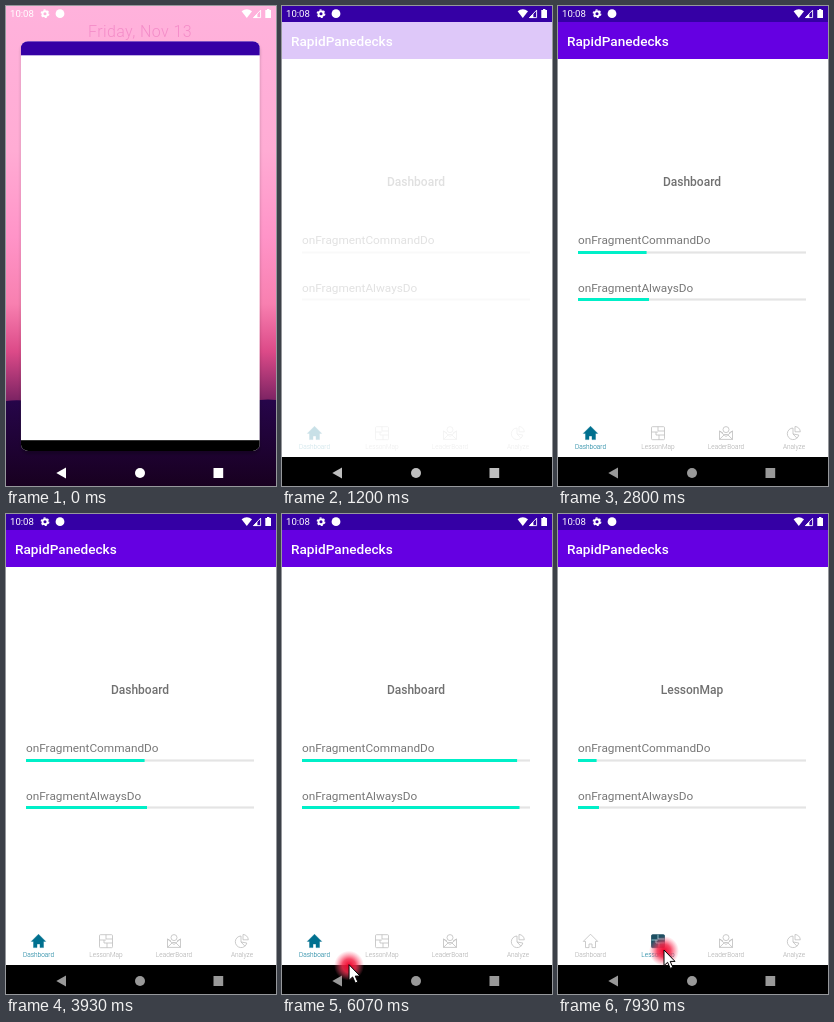
These frames come from a looping animation (270x480 px, 8 s). An HTML page:

```html
<!DOCTYPE html>
<html lang="en">
<head>
<meta charset="utf-8">
<title>Tab pager demo</title>
<style>
  html, body { margin: 0; width: 100%; height: 100%; overflow: hidden; background: #000; }
  svg { display: block; width: 100%; height: 100%; }
  text { font-family: Roboto, sans-serif; }
  .label { font-size: 11.8px; fill: #787878; }
  .tab { fill: none; stroke: #bebebe; stroke-width: .8; stroke-linejoin: round; }
  .tab text { font-size: 6.5px; font-weight: 300; text-anchor: middle; fill: #a8a8a8; stroke: none; }
  .tab.on .body { fill: #00708f; stroke: #00708f; stroke-width: .4; }
  .tab.on .map { fill: #1d4f62; stroke: #1d4f62; }
  .tab.on .inner { stroke: #a9dbe2; }
  .tab.on text { fill: #007796; }
  .track { fill: #e4e4e4; }
  .fill { fill: #00efc8; }
</style>
</head>
<body>
<svg viewBox="0 0 270 480" preserveAspectRatio="none">
  <defs>
    <linearGradient id="sky" x2="0" y2="1">
      <stop offset="0" stop-color="#ffb2dc"/>
      <stop offset=".3" stop-color="#ffacd4"/>
      <stop offset=".48" stop-color="#ff94c8"/>
      <stop offset=".62" stop-color="#f880b0"/>
      <stop offset=".72" stop-color="#dc4a88"/>
      <stop offset=".82" stop-color="#7e2464"/>
    </linearGradient>
    <linearGradient id="hill" x2="0" y2="1">
      <stop offset="0" stop-color="#26054a"/>
      <stop offset="1" stop-color="#180020"/>
    </linearGradient>
    <radialGradient id="glow">
      <stop offset="0" stop-color="#f00028"/>
      <stop offset=".45" stop-color="#f52a4c" stop-opacity=".85"/>
      <stop offset="1" stop-color="#ff6080" stop-opacity="0"/>
    </radialGradient>
    <filter id="shadow"><feDropShadow dx="0" dy="3" stdDeviation="1.5" flood-opacity=".25"/></filter>
    <clipPath id="frame"><rect id="frameRect" width="270"/></clipPath>
  </defs>

  <g id="wallpaper">
    <rect width="270" height="480" fill="url(#sky)"/>
    <path d="M0 395Q20 392 40 400H230Q250 392 270 394V480H0Z" fill="url(#hill)"/>
    <text x="134" y="31" font-size="16" font-weight="300" letter-spacing=".4" text-anchor="middle" fill="#f48cc8">Friday, Nov 13</text>
  </g>

  <g id="shade">
    <g id="window">
      <g clip-path="url(#frame)">
        <rect width="270" height="480" fill="#fff"/>
        <rect width="270" height="16" fill="#3500a5"/>
        <rect y="451" width="270" height="29"/>
      </g>
    </g>
  </g>

  <g id="app">
    <rect y="16" width="270" height="37" fill="#6500e2"/>
    <text x="9" y="39.5" font-size="13.6" font-weight="500" fill="#fff">RapidPanedecks</text>
    <text id="heading" x="134" y="179.6" font-size="12" font-weight="500" text-anchor="middle" fill="#707070"></text>
    <text class="label" x="20" y="238">onFragmentCommandDo</text>
    <text class="label" x="20" y="285.6">onFragmentAlwaysDo</text>
    <g id="bars">
      <rect class="track" x="20" y="245.4" width="228" height="2.2"/>
      <rect class="track" x="20" y="292.4" width="228" height="2.2"/>
      <rect class="fill" x="20" y="245" height="3"/>
      <rect class="fill" x="20" y="292" height="3"/>
    </g>
    <g class="tab" transform="translate(32.5 427)">
      <path class="body" d="M0-6.8L7.2 .4H5V6.6H1.5V3H-1.5V6.6H-5V.4H-7.2Z"/>
      <text y="16">Dashboard</text>
    </g>
    <g class="tab" transform="translate(100 427)">
      <rect class="map" x="-6.5" y="-6.3" width="13" height="13" rx="1"/>
      <path class="inner" d="M-6.5-1H-2V2H1V6.7M0-6.3V-2H6.5M1 2H6.5M-2-1H0"/>
      <text y="16">LessonMap</text>
    </g>
    <g class="tab" transform="translate(168 427)">
      <circle cy="-3.4" r="3"/>
      <path d="M-3 0L-6.5-2V6.4H6.5V-2L3 0M-6.5 6.4L-1.5 1.5H1.5L6.5 6.4M-6.5-2L0 3.5L6.5-2"/>
      <text y="16">LeaderBoard</text>
    </g>
    <g class="tab" transform="translate(236 427)">
      <path d="M-1-5A5.8 5.8 0 1 0 4.8 2L-1 1ZM1-6.5V-1.2H6.3A5.4 5.4 0 0 0 1-6.5ZM-1 1L3 5.2"/>
      <text y="16">Analyze</text>
    </g>
  </g>

  <g fill="#fff">
    <text x="4" y="11.4" font-size="9.6">10:08</text>
    <circle cx="39" cy="7.7" r="2.5" fill="none" stroke="#fff" stroke-width="1.9"/>
    <circle cx="39" cy="7.7" r="3.8" fill="none" stroke="#fff" stroke-width="1.2" stroke-dasharray="2 1.98"/>
    <circle cx="54" cy="7.7" r="4.4"/>
    <path d="M235.6 5.3Q240.8 1.2 246 5.3L240.8 12Z"/>
    <path d="M247.5 11.6L254.6 4.2V11.6Z" fill="none" stroke="#fff" stroke-width=".9"/>
    <path d="M247 12L251.4 7.5V12Z"/>
    <path d="M259.3 4H261V3H263.4V4H265V12H259.3Z"/>
  </g>
  <g id="nav">
    <path d="M50.3 467L60 461.5V472.5Z"/>
    <circle cx="134" cy="467" r="5"/>
    <rect x="207.5" y="462" width="9.7" height="10"/>
  </g>
  <g id="pointer">
    <circle r="15" fill="url(#glow)"/>
    <path d="M0-1V14.6L3.6 11.3L6.3 17.4L8.8 16.3L6.2 10.4H11Z" fill="#fff" stroke="#000" stroke-width="1"/>
  </g>
</svg>
<script>
const LOOP = 8000, SWITCH = 7400;
const el = id => document.getElementById(id);
const tabs = document.querySelectorAll('.tab');
const fills = document.querySelectorAll('.fill');
const pages = ['Dashboard', 'LessonMap'];

// Rows of [time, value, ...], joined by straight lines and held at both ends.
function track(rows, t) {
  if (t <= rows[0][0]) return rows[0].slice(1);
  const i = rows.findIndex(row => row[0] > t);
  if (i < 0) return rows[rows.length - 1].slice(1);
  const a = rows[i - 1], b = rows[i], k = (t - a[0]) / (b[0] - a[0]);
  return a.slice(1).map((v, j) => v + (b[j + 1] - v) * k);
}

// Each row: time, scale, left, top, corner radius, visible height.
const opening = [
  [0, .884, 15, 35.4, 8, 463],
  [70, .94, 7.8, 18.3, 4, 471],
  [130, .972, 3.6, 8.5, 2, 476],
  [200, .992, 1, 2.4, .5, 479],
  [270, 1, 0, 0, 0, 480]
];
const fade = [[1070, 0], [1670, 1]];
const navGrey = [[870, 255], [1400, 153]];
const barEdge = [
  [[1300, 20], [1670, 38], [2530, 79], [2730, 91], [3130, 107], [3330, 113],
   [3530, 124], [3930, 141], [4530, 169], [4930, 187], [5070, 191.5],
   [5870, 229], [6270, 246], [6930, 246], [7070, 248]],
  [[SWITCH, 20], [7530, 25], [7730, 33], [7930, 41]]
];
const approach = [[6000, 61, 457], [6200, 78, 442], [6400, 91, 430], [6530, 95, 427]];

// Progress is refreshed in pairs of ticks, five pairs a second.
function tick(t) {
  const phase = t - 70, n = Math.floor(phase / 200);
  return n * 200 + 70 + (phase - n * 200 < 60 ? 0 : 60);
}

function drawWindow(t) {
  const [scale, left, top, radius, height] = track(opening, t);
  el('wallpaper').style.display = scale < 1 ? '' : 'none';
  el('shade').setAttribute('filter', scale < 1 ? 'url(#shadow)' : 'none');
  el('window').setAttribute('transform', `translate(${left} ${top}) scale(${scale})`);
  el('frameRect').setAttribute('height', height);
  el('frameRect').setAttribute('rx', radius);
}

function drawPage(t) {
  const page = t < SWITCH ? 0 : 1;
  const [edge] = track(barEdge[page], tick(t));
  const first = page === 0 && edge >= 246 ? 248 : edge - 2.4;
  [first, edge].forEach((x, i) => fills[i].setAttribute('width', Math.max(0, x - 20)));
  el('heading').textContent = pages[page];
  tabs.forEach((tab, i) => tab.classList.toggle('on', i === page));
  el('app').setAttribute('opacity', track(fade, t)[0]);
  const grey = Math.round(track(navGrey, t)[0]);
  el('nav').setAttribute('fill', `rgb(${grey},${grey},${grey})`);
}

function drawPointer(t) {
  const [x, y] = t < 7000 ? track(approach, t) : t < 7070 ? [101, 432] : [106, 437];
  el('pointer').style.display = t < 6000 ? 'none' : '';
  el('pointer').setAttribute('transform', `translate(${x} ${y})`);
}

const start = performance.now();
function render() {
  const t = (performance.now() - start) % LOOP;
  drawWindow(t);
  drawPage(t);
  drawPointer(t);
  requestAnimationFrame(render);
}
render();
</script>
</body>
</html>
```
